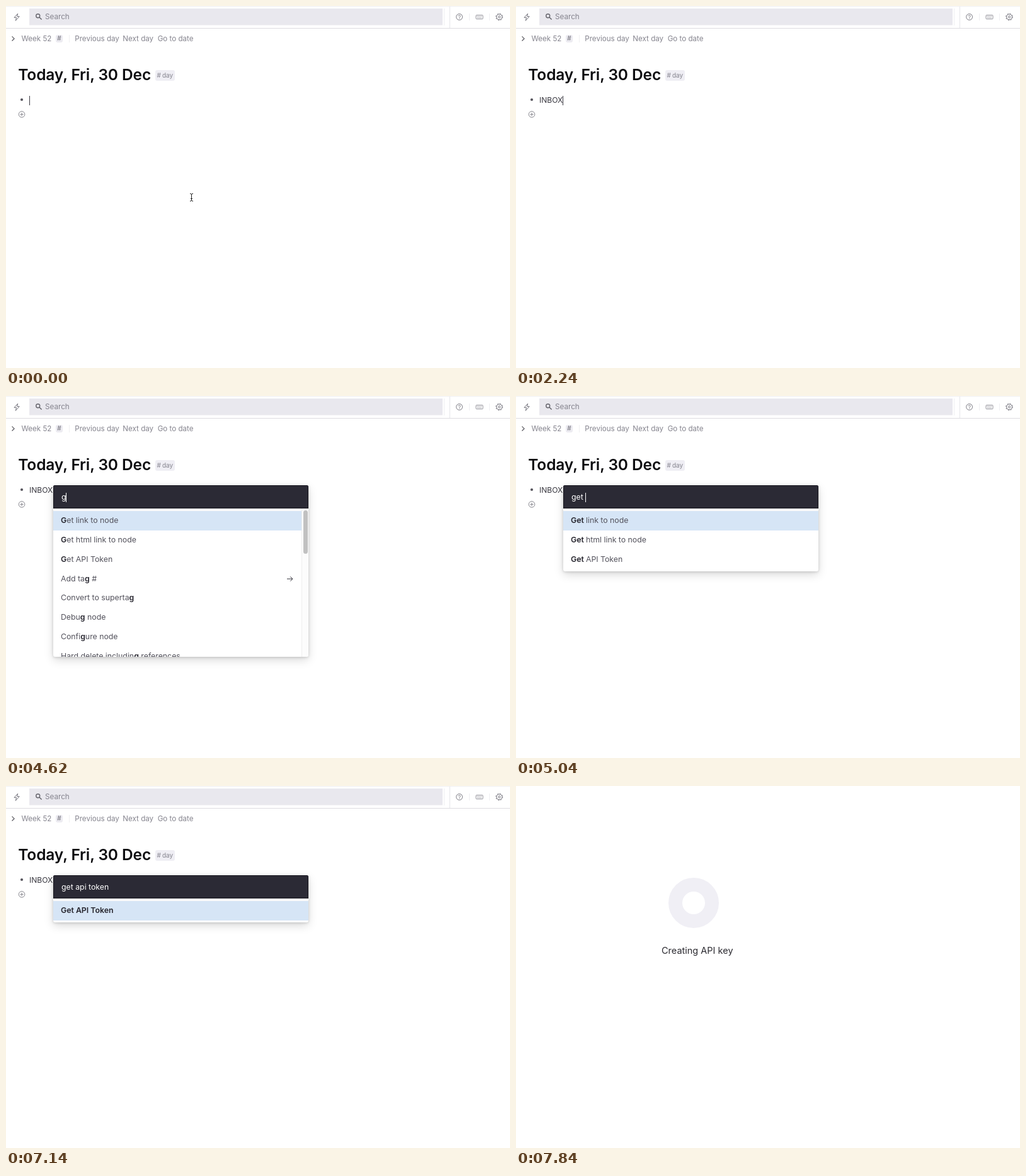
An HTML page for the animation above (8000 ms loop, 800 by 576 pixels).

```html
<!DOCTYPE html>
<html lang="en">
<head>
<meta charset="utf-8">
<title>Command menu</title>
<style>
  html, body { margin: 0; width: 100%; height: 100%; overflow: hidden; background: #fff; }
  body { position: relative; font: 400 12.3px Inter, sans-serif; font-optical-sizing: none; color: #53525c; }
  svg { display: block; font-family: Inter, sans-serif; }
  #page, #loading { position: absolute; left: 0; top: 0; }
  #note { position: absolute; left: 37px; top: 141.5px; font-size: 12.1px; line-height: 15px; color: #3a3941; white-space: pre; }
  .caret { display: inline-block; width: 1px; height: 15px; margin: 0 -.5px; vertical-align: middle; background: currentColor; }
  #menu { position: absolute; left: 75px; top: 142px; width: 405px; border-radius: 3px; overflow: hidden; background: #fff;
    box-shadow: 0 5px 15px rgba(0,0,0,.15), 0 1px 4px rgba(0,0,0,.16); }
  #input { height: 37px; line-height: 37px; padding-left: 13px; background: #2b2a35; color: #fff; white-space: pre;
    box-shadow: inset 0 0 0 1px #17161e; }
  #hint { color: #8b8a93; }
  #list { position: relative; box-sizing: border-box; max-height: 235.5px; padding: 4px 0 3.2px; overflow: hidden; }
  .row { position: relative; height: 30.85px; line-height: 30.85px; padding-left: 12px; white-space: pre; }
  .row.selected { background: #d6e5f6; }
  .row b { font-weight: 600; color: #25242d; }
  .row svg { position: absolute; left: 370px; top: 10.4px; }
  #bar { position: absolute; right: 0; top: 0; width: 10px; height: 100%; background: #fcfcfc; border-left: 1px solid #eee; }
  #thumb { position: absolute; left: 2px; top: 3px; width: 7px; border-radius: 4px; background: #c1c1c1; }
</style>
</head>
<body>
<div id="app">
  <svg id="page" width="800" height="576" fill="none" stroke="#77767f">
    <g stroke="none">
      <path fill="#f0f0f2" d="M0 0h800v1H0z"/>
      <path fill="#dddce1" d="M0 35h800v1H0z"/>
      <path fill="#e9e8ee" d="M37 4h656v26.5H37z"/>
      <path fill="#e6e5ea" d="M704 1h1v34h-1z"/>
      <path fill="#efeff2" d="M735 12h1v11h-1zM767 12h1v11h-1zM100 46h1v12h-1zM695 4h1v27h-1z"/>
      <rect x="79" y="46" width="11" height="12" rx="3" fill="#ecebf1"/>
      <rect x="237" y="102" width="31" height="17" rx="3" fill="#efeef4"/>
    </g>
    <path d="M18.8 12l-5.8 6.4h3.6l-1.4 5 6-6.8h-3.7z" stroke-linejoin="round"/>
    <g stroke="#64636b" stroke-width="1.4"><circle cx="50.7" cy="15.8" r="3"/><path d="M53 18l3.6 3.6"/></g>
    <circle cx="719.6" cy="17.4" r="4.9"/>
    <path d="M718 16.3c0-2.1 3.2-2.1 3.2 0 0 1.2-1.6 1.1-1.6 2.4m0 .7v1"/>
    <rect x="746" y="14.5" width="11" height="6.2" rx="1" stroke="#96959d"/>
    <path d="M747.5 16.6h8.2M748 18.7h7" stroke="#96959d" stroke-dasharray="1 .6"/>
    <circle cx="783" cy="17.4" r="4.4"/>
    <circle cx="783" cy="17.4" r="5.3" stroke-dasharray="2.1 2.063"/>
    <circle cx="783" cy="17.4" r="1.6"/>
    <path d="M9.5 48.3l3.6 3.6-3.6 3.6" stroke="#55545c" stroke-width="1.2"/>
    <circle cx="25" cy="149" r="2.1" fill="#55545c" stroke="none"/>
    <g stroke="#88878f"><circle cx="25" cy="172.4" r="4.8"/><path d="M22.4 172.4h5.2M25 169.8v5.2"/></g>
    <g stroke="none" fill="#85848e" font-size="11.6">
      <text x="62" y="21.4" font-size="11.7">Search</text>
      <text x="24.5" y="56">Week 52</text>
      <text x="109.3" y="56">Previous day</text>
      <text x="185.3" y="56">Next day</text>
      <text x="240.7" y="56">Go to date</text>
      <text x="81.3" y="55.4" font-size="10" fill="#6a6973">#</text>
      <text x="239.5" y="114" font-size="10">#</text>
      <text x="248" y="114" font-size="10">day</text>
      <text x="19.2" y="118.2" font-size="24.5" font-weight="600" letter-spacing="-.12" fill="#0d0d10">Today, Fri, 30 Dec</text>
    </g>
    <path id="pointer" d="M292 298.5q2.5 0 2.5 1.5v9q0 1.5-2.5 1.5m5-12q-2.5 0-2.5 1.5m0 9q0 1.5 2.5 1.5M293 306.5h3" stroke="#222"/>
  </svg>
  <div id="note"><span id="noteText"></span><span class="caret" id="noteCaret"></span></div>
  <div id="menu">
    <div id="input"><span id="queryText"></span><span class="caret" id="menuCaret"></span><span id="hint">Enter command...</span></div>
    <div id="list"></div>
  </div>
</div>
<svg id="loading" width="800" height="576">
  <circle cx="282" cy="186" r="29" fill="none" stroke="#f0eff5" stroke-width="22"/>
  <text x="231" y="267.3" font-size="14.5" fill="#2b2a30">Creating API key</text>
</svg>
<script>
const LOOP = 8000, MENU_OPEN = 3150, SUBMIT = 7140, LOADING = 7280, BLINK = 490;
const NOTE = "INBOX", QUERY = "get api token";
const noteKeys = [1050, 1260, 1470, 1680, 1820];
const queryKeys = [3990, 4690, 4830, 4970, 5110, 5320, 5460, 5670, 5740, 5880, 5950, 6020, 6090];
const caretResets = [-70, ...noteKeys, MENU_OPEN, 4620, ...queryKeys];

const suggestions = ["Find nodes", "Add tag #", "Convert to supertag", "Move to",
  "View as list", "View as cards", "View as table", "Show view options"];
const commands = ["Get link to node", "Get html link to node", "Get API Token", "Add tag #",
  "Convert to supertag", "Debug node", "Configure node", "Hard delete including references"];
const withSubmenu = ["Find nodes", "Add tag #", "Move to"];
const arrow = '<svg width="12" height="10" fill="none" stroke="#33323b"><path d="M1 5h9M6.3 1.4L9.9 5 6.3 8.6"/></svg>';

const $ = id => document.getElementById(id);
const show = (id, on) => $(id).style.display = on ? "" : "none";
const typed = (text, keys, t) => text.slice(0, keys.filter(k => k <= t).length);

function highlight(label, query) {
  const at = label.toLowerCase().indexOf(query), end = at + query.length;
  return query ? `${label.slice(0, at)}<b>${label.slice(at, end)}</b>${label.slice(end)}` : label;
}

function renderList(query) {
  const items = query ? commands.filter(c => c.toLowerCase().includes(query)) : suggestions;
  const selected = query ? 0 : 3;
  const rows = items.map((label, i) =>
    `<div class="row${i === selected ? " selected" : ""}">${highlight(label, query)}${withSubmenu.includes(label) ? arrow : ""}</div>`);
  const bar = `<div id="bar"><div id="thumb" style="height:${query ? 69 : 16}px"></div></div>`;
  $("list").innerHTML = rows.join("") + (items.length > 7 ? bar : "");
}

let shownQuery = null;
function draw(now) {
  const t = now % LOOP;
  const menuOpen = t >= MENU_OPEN;
  const lastReset = Math.max(...caretResets.filter(r => r <= t));
  const caretOn = t < SUBMIT && (t - lastReset) % (2 * BLINK) < BLINK;
  const query = typed(QUERY, queryKeys, t);

  show("app", t < LOADING);
  show("loading", t >= LOADING);
  show("pointer", t < noteKeys[0]);
  show("menu", menuOpen);
  show("hint", !query);
  $("noteText").textContent = typed(NOTE, noteKeys, t);
  $("queryText").textContent = query;
  $("noteCaret").style.opacity = +(caretOn && !menuOpen);
  $("menuCaret").style.opacity = +caretOn;
  if (query !== shownQuery) renderList(shownQuery = query);
  requestAnimationFrame(draw);
}
draw(0);
</script>
</body>
</html>
```
